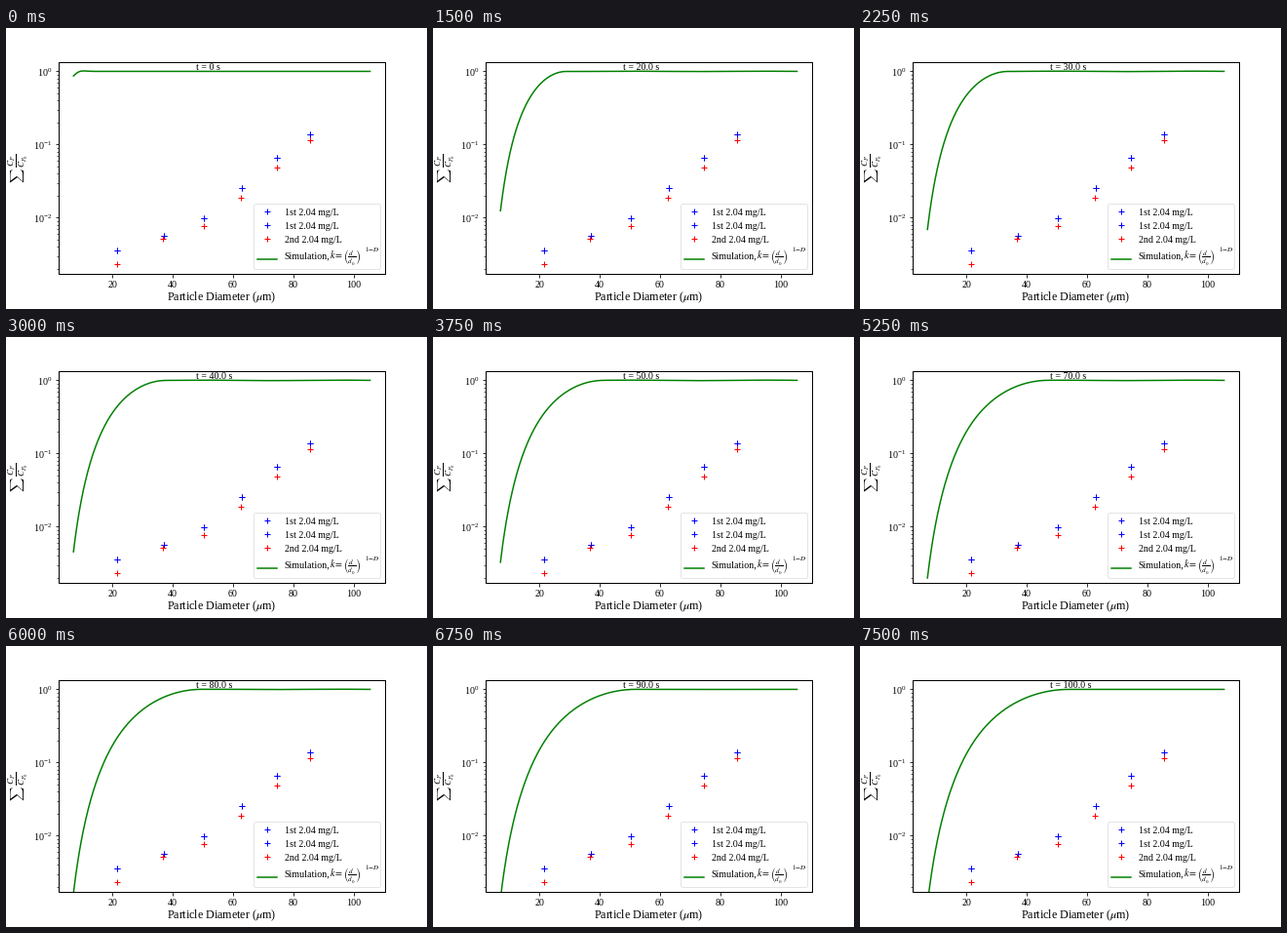
Animation of 432x288 px, one loop 8000 ms. Source, as a matplotlib script:

```python
import numpy as np
import matplotlib.pyplot as plt
from matplotlib.animation import FuncAnimation
from matplotlib.patches import FancyBboxPatch

W, H, DPI = 432, 288, 72
TICK_MS, FRAMES = 250, 32
HOLD = 3  # ticks per simulated step of 10 s

plt.rcParams.update({
    "font.family": "Liberation Serif",
    "font.size": 10,
    "mathtext.fontset": "stix",
    "axes.linewidth": 1.0,
})

fig = plt.figure(figsize=(W / DPI, H / DPI), dpi=DPI, facecolor="white")
ax = fig.add_axes([0.125, 0.125, 0.775, 0.755])
ax.set_yscale("log")

D_MIN, D_MAX = 7.0, 105.5
LOG_MIN = np.log10(0.00231)
x_pad, y_pad = 0.05 * (D_MAX - D_MIN), -0.05 * LOG_MIN
ax.set_xlim(D_MIN - x_pad, D_MAX + x_pad)
ax.set_ylim(10 ** (LOG_MIN - y_pad), 10 ** y_pad)
ax.set_xticks([20, 40, 60, 80, 100])

# Overlay in pixel units, origin at the top left
px = fig.add_axes([0, 0, 1, 1])
px.set_xlim(0, W)
px.set_ylim(H, 0)
px.axis("off")


def pluses(axes, x, y, color):
    axes.plot(x, y, "+", color=color, ms=6, mew=1, zorder=3)


def label(x, y, text, size=10, **kw):
    px.text(x, y, text, fontsize=size, va=kw.pop("va", "baseline"), **kw)


first = [(21.5, 0.00351), (37.0, 0.00565), (50.3, 0.0098),
         (62.9, 0.0255), (74.6, 0.066), (85.6, 0.1375)]
second = [(21.5, 0.00231), (36.8, 0.00515), (50.3, 0.0077),
          (62.6, 0.0188), (74.6, 0.0485), (85.6, 0.1145)]
# The first run is plotted twice, as in the legend
runs = [("1st", first, "blue"), ("1st", first, "blue"),
        ("2nd", second, "red")]
for _, points, color in runs:
    pluses(ax, *zip(*points), color)

label(221.4, 279, r"Particle Diameter ($\mu$m)", 12, ha="center")
upright = dict(va="center", ha="center", rotation=90)
label(12, 151, r"$\sum$", 10, math_fontfamily="cm", **upright)
label(13, 136, r"$\frac{C_P}{C_{P_0}}$", 13, **upright)

# Legend
px.add_patch(FancyBboxPatch(
    (254.5, 180.5), 130, 67, boxstyle="round,pad=0,rounding_size=2",
    fc="white", ec="0.87", lw=1, alpha=0.8))
for row, (run, _, color) in enumerate(runs):
    y = 188 + 14 * row
    pluses(px, [268.3], [y], color)
    label(285.8, y + 3.5, f"{run} 2.04 mg/L")
px.plot([258, 278], [237, 237], color="green", lw=1.5)
label(285.8, 236.5, "Simulation,")
label(331.5, 236.5, r"$k=\left(\frac{d}{d_0}\right)$")
label(368, 229, r"$1{-}D$", 7)

d = np.linspace(D_MIN, D_MAX, 600)
curve, = ax.plot([], [], color="green", lw=1.5, zorder=2)
clock = ax.text(0.42, 0.96, "", transform=ax.transAxes, zorder=4)


def remaining(t):
    """Fraction of particles of each diameter left after t seconds."""
    q = d - D_MIN
    u = 1 + 0.1 * np.exp(-q / 1.6) * np.cos(np.pi * q / 4.4)
    if t == 0:
        return u ** -1.5
    edge = 29 * (t / 20) ** 0.386
    s = d / edge
    fade = (1 - np.minimum(s, 1) ** 3.5) ** 2
    u = u + 0.89 * t * (1 + q / 4.7) ** -2.55 * fade
    ripple = 0.0035 * np.sin(np.pi * t / 100) * np.clip((s - 0.9) * 5, 0, 1)
    return u ** -1.5 * 10 ** (ripple * np.cos(2 * np.pi * (d - 50) / 45))


def draw(i):
    t = 10 * (i // HOLD)
    curve.set_data(d, remaining(t))
    clock.set_text(f"t = {t:.1f} s" if t else "t = 0 s")
    return curve, clock


anim = FuncAnimation(fig, draw, frames=FRAMES, interval=TICK_MS,
                     repeat=True, repeat_delay=0, blit=False)
plt.show()
```
